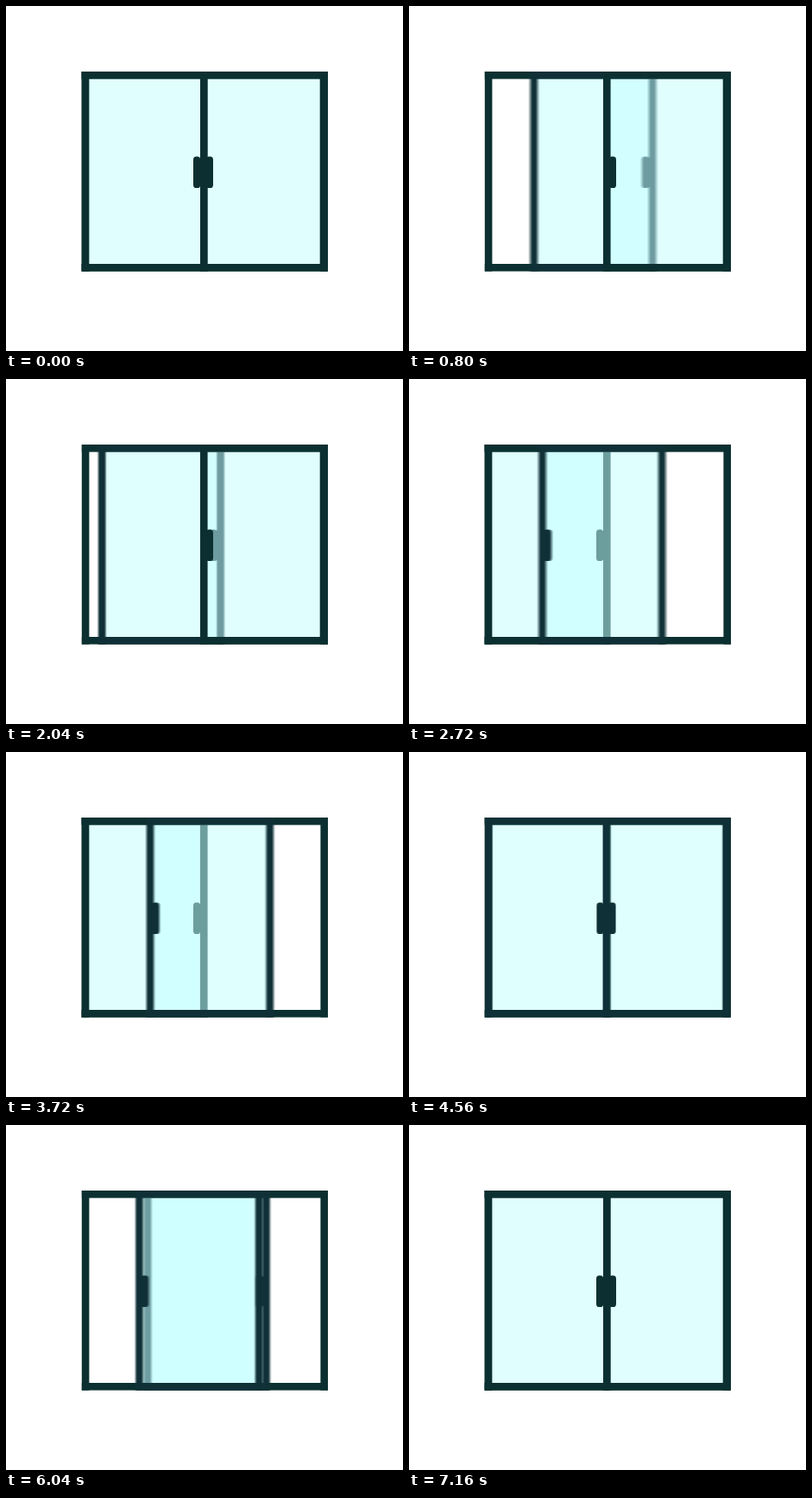
An HTML page with a canvas that plays this animation: 460x400 px, repeating every 7.2 s.

```html
<!DOCTYPE html>
<html lang="en">
<head>
<meta charset="utf-8">
<title>Sliding window</title>
<style>
  html, body { margin: 0; width: 100%; height: 100%; overflow: hidden; background: #fff; }
  canvas { display: block; width: 460px; height: 400px; }
</style>
</head>
<body>
<canvas id="stage" width="460" height="400"></canvas>
<script>
const W = 460, H = 400, LOOP = 7200, STEP = 40, SHUTTER = 18, SAMPLES = 8;
const DARK = '#0c3031', GLASS = 'rgba(197,253,255,.52)';
const TOP = 76, BOTTOM = 307.6, BAR = 8.6;

// [start, end, from, to] in ms and px
const leftMoves = [
  [460, 1400, 0, 138.5], [1400, 2330, 138.5, 0],
  [4530, 5500, 0, 138], [5500, 6800, 138, 0]
];
const rightMoves = [
  [2310, 3210, 0, -137], [3210, 4330, -137, 0],
  [4530, 5500, 0, -137], [5500, 6840, -137, -.3], [6840, 7160, -.3, 0]
];

function makeLayer() {
  const c = document.createElement('canvas');
  c.width = W;
  c.height = H;
  return c.getContext('2d');
}

// Cubic bezier (.33, 0, .48, 1), solved by bisection
function ease(x) {
  let lo = 0, hi = 1, u = x;
  for (let i = 0; i < 22; i++) {
    u = (lo + hi) / 2;
    const v = 1 - u;
    if (3 * u * v * v * .33 + 3 * u * u * v * .48 + u * u * u < x) lo = u;
    else hi = u;
  }
  return u * u * (3 - 2 * u);
}

function offset(moves, t) {
  const m = moves.find(([a, b]) => t >= a && t < b);
  return m ? m[2] + (m[3] - m[2]) * ease((t - m[0]) / (m[1] - m[0])) : 0;
}

function border(g, x0, x1) {
  g.fillStyle = DARK;
  g.fillRect(x0, TOP, x1 - x0, BAR);
  g.fillRect(x0, BOTTOM - BAR, x1 - x0, BAR);
  g.fillRect(x0, TOP, BAR, BOTTOM - TOP);
  g.fillRect(x1 - BAR, TOP, BAR, BOTTOM - TOP);
}

function makePanel(x0, x1, handleX) {
  const g = makeLayer();
  g.fillStyle = GLASS;
  g.fillRect(x0 + BAR / 2, TOP + BAR / 2, x1 - x0 - BAR, BOTTOM - TOP - BAR);
  border(g, x0, x1);
  g.beginPath();
  g.roundRect(handleX, 174.6, 8.2, 36.4, 3.6);
  g.fill();
  return g.canvas;
}

const ctx = document.getElementById('stage').getContext('2d');
const blur = makeLayer();
const panels = [
  { sprite: makePanel(87.6, 233.6, 217), moves: leftMoves },
  { sprite: makePanel(225, 372.3, 231.8), moves: rightMoves }
];

// Averages several shifted copies for horizontal motion blur
function drawPanel({ sprite, moves }, t) {
  const a = offset(moves, t - SHUTTER / 2), b = offset(moves, t + SHUTTER / 2);
  if (Math.abs(b - a) < .3) {
    ctx.drawImage(sprite, offset(moves, t), 0);
    return;
  }
  blur.clearRect(0, 0, W, H);
  blur.globalCompositeOperation = 'lighter';
  blur.globalAlpha = 1 / SAMPLES;
  for (let i = 0; i < SAMPLES; i++) {
    blur.drawImage(sprite, a + (b - a) * (i + .5) / SAMPLES, 0);
  }
  ctx.drawImage(blur.canvas, 0, 0);
}

function draw(t) {
  ctx.fillStyle = '#fff';
  ctx.fillRect(0, 0, W, H);
  border(ctx, 87.8, 373);
  panels.forEach(p => drawPanel(p, t));
}

const start = performance.now();
function tick() {
  const t = (performance.now() - start) % LOOP;
  draw(Math.floor(t / STEP) * STEP);
  requestAnimationFrame(tick);
}
tick();
</script>
</body>
</html>
```
